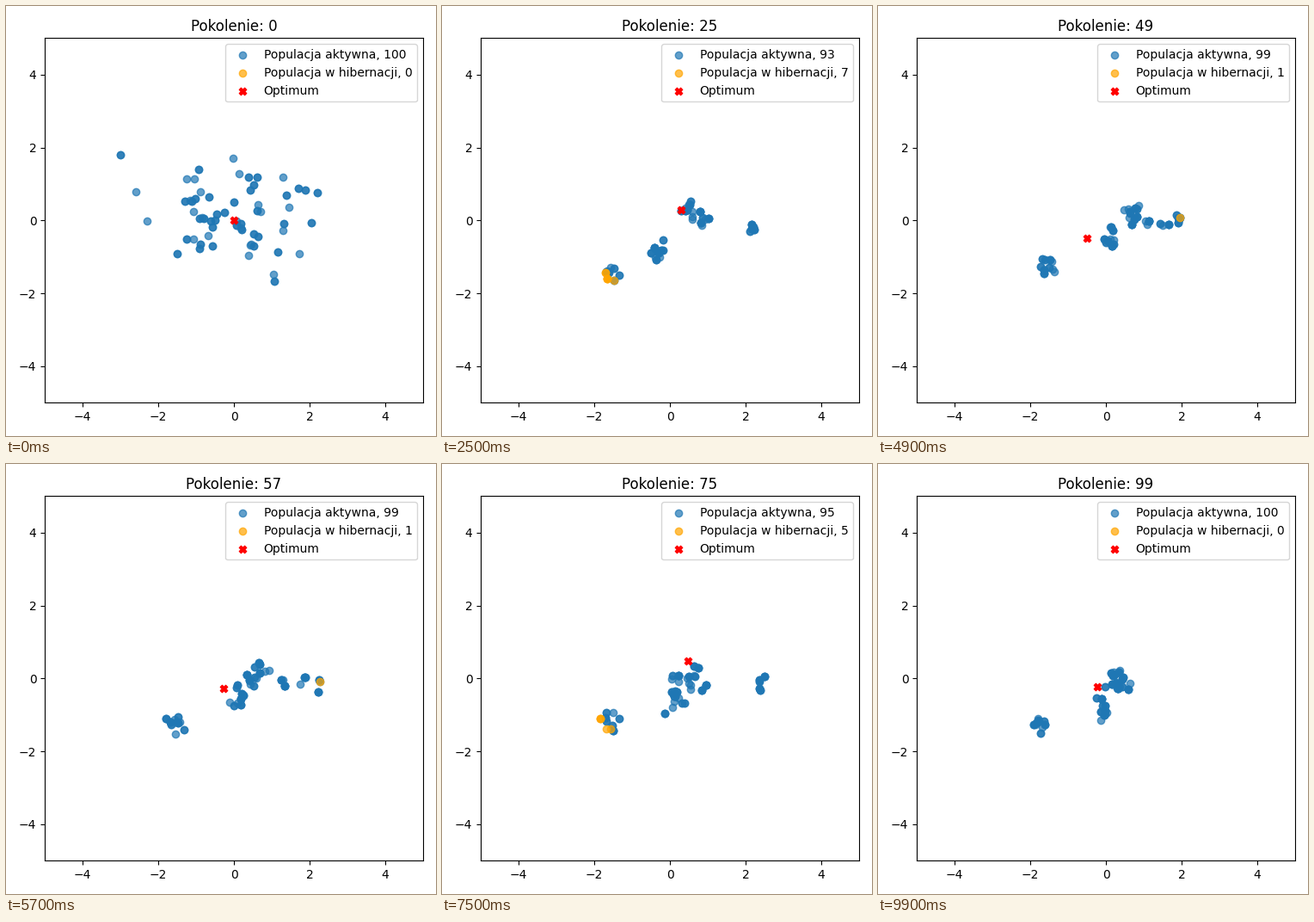
Animation of 500 by 500 pixels, one loop 10000 ms. Source, as a matplotlib script:

```python
import numpy as np
import matplotlib.pyplot as plt
from matplotlib.animation import FuncAnimation

SIZE, GENERATIONS, LIFE = 100, 100, 8
rng = np.random.default_rng(12)

MARKS = [0, 13, 25, 49, 65, 85, 99]
ASLEEP = [0, 3, 7, 1, 1, 9, 0]

# Clans: number of spots, spread, and centre at each mark after the start
CLANS = [
    (11, (.14, .13), [(-1.55, -1.4), (-1.6, -1.4), (-1.55, -1.3),
                      (-1.6, -1.15), (-1.65, -1.3), (-1.75, -1.3)]),
    (14, (.13, .18), [(-.2, -.65), (-.3, -.85), (.1, -.5),
                      (.2, -.5), (.08, -.75), (-.05, -.85)]),
    (11, (.15, .15), [(.4, .4), (.55, .25), (.75, .15),
                      (.6, .1), (.15, -.2), (.25, 0)]),
    (6, (.2, .08), [(.7, -.2), (.95, -.05), (1.4, -.05),
                    (.6, -.2), (.6, .05), (.4, -.2)]),
    (6, (.08, .12), [(2.1, -.35), (2.2, -.28), (1.92, .05),
                     (2.28, -.25), (2.36, -.05), (.3, -.1)]),
]


def scattered(count, low, high):
    """A bell-shaped cloud that just fills the given box."""
    p = rng.normal(size=(count, 2))
    p = (p - p.min(axis=0)) / np.ptp(p, axis=0)
    return low + p * np.subtract(high, low)


sizes = [clan[0] for clan in CLANS]
spread = np.repeat([clan[1] for clan in CLANS], sizes, axis=0)
homes = np.repeat([clan[2] for clan in CLANS], sizes, axis=0)
spots = len(homes)

# Several individuals may share a spot; each spot moves on at its own time
spot_of = rng.integers(spots, size=SIZE)
patience = rng.random(spots)
phase = rng.integers(LIFE, size=spots)
mutations = rng.normal(size=(spots, GENERATIONS // LIFE + 2, 2)).clip(-1.8, 1.8)

start = scattered(62, (-3, -1.67), (2.2, 1.8))[np.arange(SIZE) % 62]
leave = rng.exponential(3.5, SIZE).clip(0.5, 12)
leave[start[:, 0].argmin()] = 17


def positions(gen):
    stage = np.interp(gen, MARKS[1:], range(len(MARKS) - 1))
    mark = int(stage) + (stage % 1 > patience)
    every = np.arange(spots)
    offset = mutations[every, (gen + phase) // LIFE] * spread
    spot_pos = homes[every, mark] + offset
    return np.where((gen < leave)[:, None], start, spot_pos[spot_of])


fig, ax = plt.subplots(figsize=(5, 5), dpi=100)


def draw(gen):
    pos = positions(gen)
    best = 0.5 * np.sin(0.1 * gen)
    # The individuals farthest from the optimum hibernate
    order = np.argsort(-np.hypot(*(pos - best).T), kind="stable")
    count = round(np.interp(gen, MARKS, ASLEEP))
    dormant, active = pos[order[:count]], pos[order[count:]]
    ax.clear()
    ax.scatter(*active.T, alpha=0.7, label=f"Populacja aktywna, {len(active)}")
    ax.scatter(*dormant.T, color="orange", alpha=0.7,
               label=f"Populacja w hibernacji, {len(dormant)}")
    ax.scatter(best, best, color="red", marker="X", label="Optimum")
    ax.set(xlim=(-5, 5), ylim=(-5, 5), title=f"Pokolenie: {gen}")
    ax.legend(loc="upper right")


draw(0)
fig.tight_layout()
anim = FuncAnimation(fig, draw, frames=GENERATIONS, init_func=lambda: None,
                     interval=100, repeat=True, repeat_delay=0)
plt.show()
```
